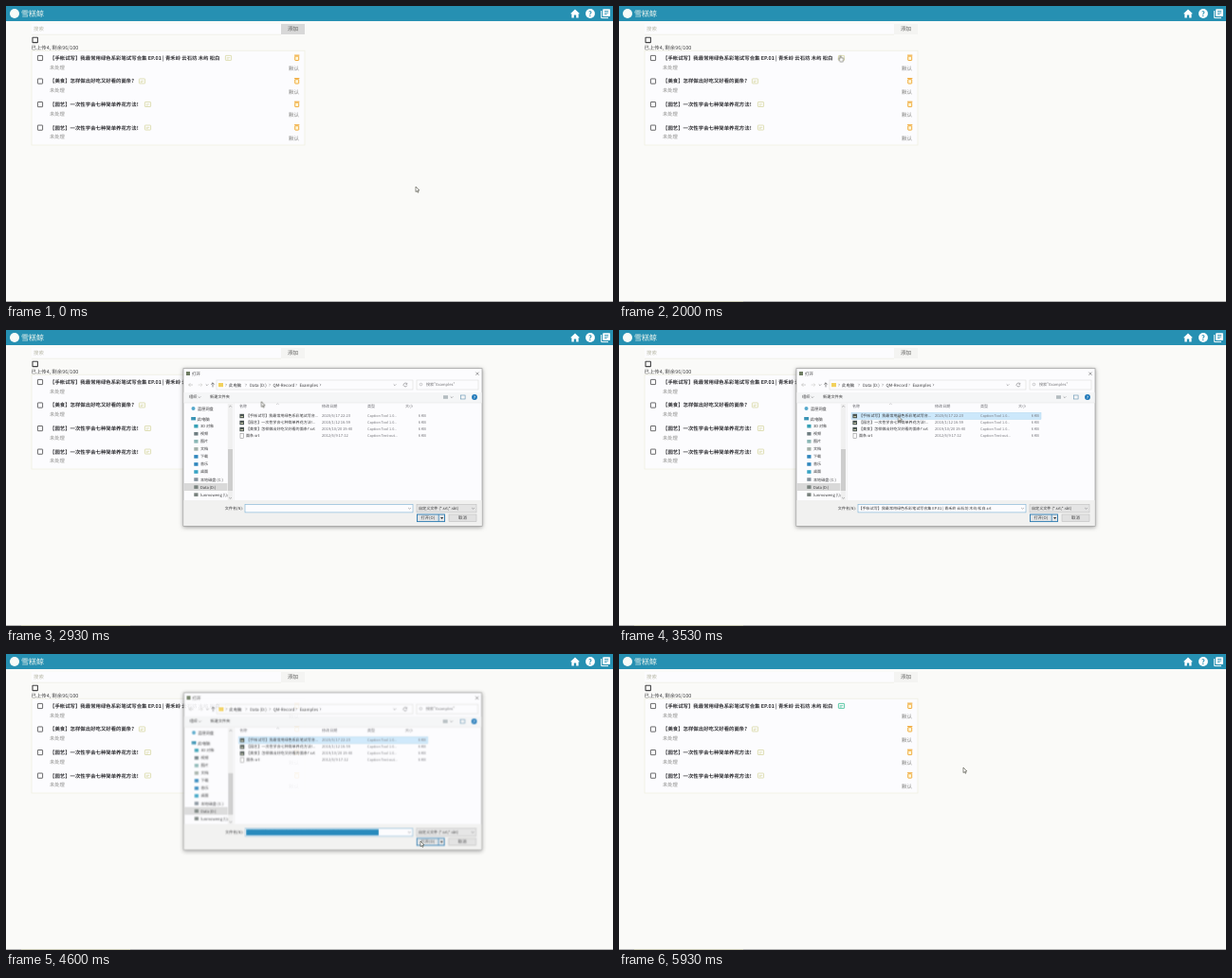
An HTML page for the animation above (5990 ms loop, 640 by 313 pixels).

```html
<!DOCTYPE html>
<html lang="zh-CN">
<head>
<meta charset="utf-8">
<title>上传字幕</title>
<style>
html, body { margin: 0; width: 100%; height: 100%; overflow: hidden; background: #fafaf8; }
svg { display: block; width: 640px; height: 313px; font-family: "Noto Sans CJK SC", "Noto Sans CJK", "Noto Sans", sans-serif; }
text { white-space: pre; text-rendering: geometricPrecision; }

#cursor, #dialog, #hand, #arrow, #focus, #picked, #marked, #done { animation: 5.99s linear infinite; }
#cursor { animation-name: move; }
#arrow { animation-name: arrow; }
#hand { animation-name: hand; }
#focus { animation-name: focus; }
#dialog { animation-name: dialog; transform-origin: 344.5px 124px; filter: drop-shadow(0 1px 2.2px rgba(60, 60, 60, .5)); }
#picked { animation-name: picked; }
#marked { animation-name: marked; }
#done { animation-name: done; }

@keyframes move {
  0%, 1.17% { transform: translate(432px, 191px); }
  10.7% { transform: translate(346px, 165px); }
  20.5% { transform: translate(290px, 98px); }
  29.2% { transform: translate(233px, 52.5px); }
  41.2% { transform: translate(232px, 53px); animation-timing-function: ease-in-out; }
  55.1%, 60.8% { transform: translate(294.5px, 91px); animation-timing-function: ease-in-out; }
  70.5%, 71.6% { transform: translate(424px, 191.5px); }
  75.1%, 94.2% { transform: translate(437px, 198px); }
  98.8%, 100% { transform: translate(363px, 120px); }
}
@keyframes arrow { 0%, 28.4% { opacity: 1; } 28.41%, 35.6% { opacity: 0; } 35.61%, 100% { opacity: 1; } }
@keyframes hand { 0%, 28.4% { opacity: 0; } 28.41%, 35.6% { opacity: 1; } 35.61%, 100% { opacity: 0; } }
@keyframes focus { 0%, 28.4% { opacity: 1; } 30%, 100% { opacity: 0; } }
@keyframes dialog {
  0%, 35.5% { opacity: 0; transform: scale(.95); }
  37.5%, 76.6% { opacity: 1; transform: none; }
  78.9% { opacity: .15; transform: scale(.966); }
  80.6%, 100% { opacity: 0; transform: scale(.95); }
}
@keyframes picked { 0%, 56.2% { opacity: 0; } 56.21%, 100% { opacity: 1; } }
@keyframes marked { 0%, 76.6% { opacity: 0; } 76.61%, 100% { opacity: 1; } }
@keyframes done { 0%, 83.4% { opacity: 0; } 83.41%, 100% { opacity: 1; } }
</style>
</head>
<body>
<svg id="stage" viewBox="0 0 640 313"></svg>
<script>
const text = (x, cy, str, size = 4.1, fill = '#38383a', more = '') =>
  `<text x="${x}" y="${cy + size * .36}" font-size="${size}" fill="${fill}" ${more}>${str}</text>`;
const rect = (x, y, w, h, fill, more = '') =>
  `<rect x="${x}" y="${y}" width="${w}" height="${h}" fill="${fill}" ${more}/>`;
const path = (d, stroke, width = .6, fill = 'none') =>
  `<path d="${d}" stroke="${stroke}" stroke-width="${width}" fill="${fill}"/>`;
const group = (id, body) => `<g id="${id}">${body}</g>`;
const box = (x, y, s, width) => rect(x, y, s, s, 'none', `stroke="#444446" stroke-width="${width}" rx=".4"`);
const chevron = (x, y) => path(`M${x - .6} ${y - 1.2}l1.2 1.2l-1.2 1.2`, '#66666a', .5);
const caret = (x, y) => path(`M${x - 1.3} ${y - .6}l1.3 1.3l1.3 -1.3`, '#66666a', .5);

const longTitle = '【手帐试写】我最常用绿色系彩笔试写合集 EP.01 | 青禾岭 云石坊 木屿 松白';
const noodles = '【美食】怎样做出好吃又好看的面条?';
const flowers = '【园艺】一次性学会七种简单养花方法!';

function header() {
  return rect(0, 0, 640, 16, '#2690b2') +
    '<circle cx="9" cy="8" r="5" fill="#f8fbf8"/>' +
    text(16, 8, '雪糕鲸', 8, '#e9f3ee') +
    path('M595 8.3L600 3.6L605 8.3H603.6V12.4H601.2V9.4H598.8V12.4H596.4V8.3Z', 'none', 0, '#fff') +
    '<circle cx="616" cy="8" r="4.9" fill="#fff"/>' +
    text(616, 8, '?', 7.5, '#2690b2', 'text-anchor="middle" font-weight="700"') +
    path('M627.7 5V12.6H635', '#fff', 1) +
    rect(629.2, 3.2, 7.8, 7.8, '#fff', 'rx=".8"') +
    path('M631 5.4h4.2M631 7.1h4.2M631 8.8h2.6', '#2690b2', .8);
}

function captionIcon(x, cy, color) {
  return rect(x + .4, cy - 2.6, 6.2, 5, 'none', `stroke="${color}" stroke-width=".8" rx=".5"`) +
    path(`M${x + 1.7} ${cy - .3}h3.6M${x + 1.7} ${cy + 1}h2`, color, .7);
}

function listRow(title, iconX, i) {
  const cy = 55 + i * 24.55;
  const bin = path(`M304 ${cy - 2.9}h5.4`, '#f0a52c', 1) +
    rect(304.7, cy - 1.9, 4, 4.4, '#fff6d8', 'stroke="#f0a52c" stroke-width=".9" rx=".4"');
  return box(33.4, cy - 2.6, 5.2, .8) +
    text(46, cy, title, 5.4, '#2f2f33', 'font-weight="700"') +
    text(46, cy + 9.7, '未处理', 5.3, '#8c8c8a') +
    captionIcon(iconX, cy, '#d8d9a4') + bin +
    text(298, cy + 11.3, '默认', 5.5, '#7a7a78');
}

function page() {
  const rows = [[longTitle, 231], [noodles, 140], [flowers, 146], [flowers, 146]];
  return rect(27, 19, 263, 11, '#fcfcfe') +
    path('M27 30.2H290', '#ebebe4', .7) +
    text(29, 24.3, '搜索', 5.4, '#b9b9a8') +
    rect(290, 19, 25, 11, '#f4f4f2') +
    rect(290, 19, 25, 11, '#d8d8d8', 'id="focus"') +
    text(297, 24.3, '添加', 5.6, '#5c5c5a') +
    box(28, 33.2, 5.4, 1.1) +
    text(26.5, 44, '已上传4, 剩余96/100', 5.4, '#444446') +
    rect(27, 47.2, 288, 99.8, '#fcfcfe', 'stroke="#efefe2" stroke-width=".8"') +
    rows.map((r, i) => listRow(...r, i)).join('') +
    group('done', rect(230.5, 51.5, 8, 7, '#fcfcfe') + captionIcon(231, 55, '#36bd92')) +
    rect(0, 312, 640, 1, '#b0b0b0') + rect(16, 312, 115, 1, '#c8c8b4');
}

function addressBar() {
  const crumbs = [[235, '此电脑', 253], [257, 'Data (D:)', 278], [281.5, 'QM-Record', 306], [309.5, 'Examples', 331.5]];
  return path('M197 58h-4.4m1.8 -1.8l-1.8 1.8l1.8 1.8', '#b4b4b0') +
    path('M202.6 58h4.2m-1.6 -1.6l1.6 1.6l-1.6 1.6', '#cacac6') + caret(212, 58) +
    path('M218 60.4v-4.6m-1.8 1.8l1.8 -1.8l1.8 1.8', '#444446') +
    rect(222, 53, 207, 10, '#fcfcfe', 'stroke="#dcdcda" stroke-width=".6"') +
    rect(224, 56, 5, 4.2, '#f2d15c') + chevron(232, 58) +
    crumbs.map(([x, s, c]) => text(x, 58, s, 4.4) + chevron(c, 58)).join('') +
    caret(410, 58) + path('M422.6 57a1.9 1.9 0 1 0 .2 1.6M422.8 55.8v1.5h-1.5', '#66666a', .5) +
    rect(433, 53, 65, 10, '#fcfcfe', 'stroke="#dcdcda" stroke-width=".6"') +
    '<circle cx="437.5" cy="57.5" r="1.3" fill="none" stroke="#99999a" stroke-width=".5"/>' +
    text(443, 58, '搜索"Examples"', 4.1, '#77777a');
}

function toolbar() {
  return rect(187.5, 66, 314, 11, '#f5f6f7') +
    text(193, 70.9, '组织', 4.3) + caret(204, 71) + text(215, 70.9, '新建文件夹', 4.2) +
    rect(461, 69.2, 5, 3.6, '#b4bcc0') + caret(470, 71) +
    rect(479.5, 69, 4.6, 4, 'none', 'stroke="#5f8fae" stroke-width=".6"') +
    '<circle cx="494" cy="71" r="2.9" fill="#1c76b8"/>' +
    text(494, 71, '?', 4.4, '#fff', 'text-anchor="middle" font-weight="700"') +
    path('M187.5 77H501.5', '#e6e6e4', .6);
}

function sidebar() {
  const items = [['3D 对象', '#35a0b5'], ['视频', '#6d7c80'], ['图片', '#8ab7b5'], ['文档', '#a3b0a8'], ['下载', '#2f86bd'],
    ['音乐', '#2f86bd'], ['桌面', '#36a3c4'], ['本地磁盘 (C:)', '#84909a'], ['Data (D:)', '#77807c'], ['lunmoweng (\\\\q', '#77807c']];
  return rect(188, 162, 45.5, 8, '#d9d9d9') +
    '<circle cx="197.5" cy="83" r="2" fill="#57a9cc"/>' + text(202, 83, '蓝匣网盘', 4.2) +
    rect(195.2, 92, 4.8, 3.4, '#3b94b5') + text(201.5, 94, '此电脑', 4.4) +
    items.map(([s, color], i) => {
      const y = 101.7 + i * 8.05;
      return rect(198.3, y - 1.8, 4.2, 3.6, color) + text(205, y, s, 4.1);
    }).join('') +
    rect(233.8, 78, 5.4, 102, '#f0f0f0') + rect(234, 126, 5, 44, '#cdcdcd') +
    path('M235.2 81.4l1.3 -1.3l1.3 1.3', '#66666a', .5) + caret(236.5, 177.6) +
    path('M240.5 77V180', '#ececea', .5);
}

function fileList() {
  const heads = [[246, '名称'], [333, '修改日期'], [381, '类型'], [421, '大小']];
  const files = [
    [longTitle.slice(0, 18) + '...', '2020/6/17 22:23', 'Caption Tool 1.0...'],
    [flowers + '...', '2018/1/12 16:59', 'Caption Tool 1.0...'],
    [noodles + '.srt', '2019/10/20 19:40', 'Caption Tool 1.0...'],
    ['面条.srt', '2012/6/9 17:12', 'Caption Text-out...']];
  const picked = rect(245, 87.4, 200, 7, '#cce8fb', 'stroke="#a3d0ec" stroke-width=".4"');
  return group('picked', picked + text(252.5, 188.6, longTitle + '.srt', 4.05)) +
    path('M285 78.8l1.4 -1l1.4 1', '#99999a', .4) +
    heads.map(([x, s]) => text(x, 81, s, 4.1, '#6a6a70')).join('') +
    files.map(([name, date, kind], i) => {
      const y = 91 + i * 7;
      const icon = i < 3
        ? rect(246.4, y - 2.2, 4.6, 4.4, '#4b5552') + rect(247.4, y + .2, 2.6, .9, '#e8e8c0')
        : rect(247, y - 2.3, 3.4, 4.6, '#fff', 'stroke="#808080" stroke-width=".5"');
      return icon + text(253, y, name, 4.05) + text(333, y, date, 4.05, '#74747a') +
        text(381, y, kind, 3.75, '#74747a') + text(443, y, '6 KB', 4, '#74747a', 'text-anchor="end"');
    }).join('');
}

function dialog() {
  const field = rect(252, 184.5, 177, 8.4, '#fcfcfe', 'stroke="#78b0d4" stroke-width=".6"');
  const footer = rect(187.5, 180, 314, 27, '#f1f1f0') +
    text(250, 188.6, '文件名(N):', 4.1, '#38383a', 'text-anchor="end"') + field + caret(425.5, 188.6) +
    rect(433, 184.5, 63, 8.4, '#e4e4e4', 'stroke="#b8b8b8" stroke-width=".5"') +
    text(435, 188.6, '自定义文件 (*.srt;*.sbt)', 4.1) + caret(492.5, 188.6) +
    rect(433.5, 195, 29, 7.6, '#e1e4e6', 'stroke="#2878b0" stroke-width=".9"') +
    path('M456.2 195v7.6', '#2878b0', .7) + text(437.5, 198.7, '打开(O)', 4.3) +
    path('M458 198.1h3.2l-1.6 1.8z', 'none', 0, '#333') +
    rect(467, 195, 29, 7.6, '#e1e1e1', 'stroke="#b8b8b8" stroke-width=".5"') + text(477, 198.7, '取消', 4.4);
  return rect(187, 40.7, 315, 166.6, '#fcfcfe', 'stroke="#9c9c9a" stroke-width=".7"') +
    rect(190, 44, 4, 4, '#6e7c62') + text(196, 46.2, '打开', 4.5) +
    path('M495.4 44.6l3.2 3.2m0 -3.2l-3.2 3.2', '#444446', .5) +
    addressBar() + toolbar() + sidebar() + footer + fileList() +
    rect(253, 185.5, 140, 6.4, '#1681b8', 'id="marked"');
}

const cursor =
  group('arrow', path('M0 0V5.6L1.3 4.4L2.1 6.3L3 5.9L2.2 4H3.9Z', '#45453a', .6, '#fff')) +
  group('hand', path('M.2 .2V3.2L-1 2.6L-.8 4L.4 6.2H3.4L4 4V2.4L1.3 1.9V.2Z', '#55554a', .6, '#fff'));

document.getElementById('stage').innerHTML =
  rect(0, 0, 640, 313, '#fafaf8') + header() + page() +
  group('dialog', dialog()) + group('cursor', cursor);
</script>
</body>
</html>
```
